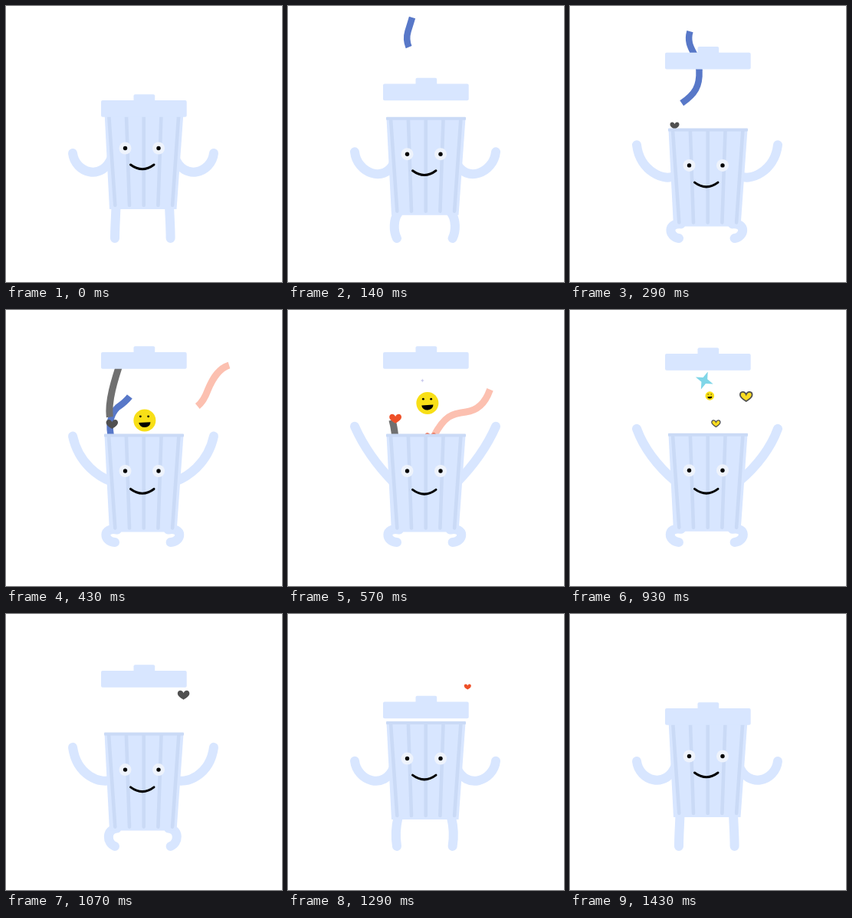
An HTML page with a canvas that plays this animation: 360 px wide and 360 px high, repeating every 1.5 s.

```html
<!DOCTYPE html>
<html lang="en">
<head>
<meta charset="utf-8">
<title>Happy bin</title>
<style>
  html, body { margin: 0; width: 100%; height: 100%; overflow: hidden; background: #fff; }
  canvas { display: block; width: 360px; height: 360px; }
</style>
</head>
<body>
<canvas id="stage" width="360" height="360"></canvas>
<script>
const ctx = document.getElementById('stage').getContext('2d');
const LOOP = 1500, STEPS = 21;
const PALE = '#d8e6ff', SHADE = '#cadaf6', DARK = '#505050';

const clamp01 = v => Math.min(1, Math.max(0, v));
const mix = (a, b, u) => a + (b - a) * u;
const progress = (k, from, to) => clamp01((k - from) / (to - from));

// Quadratic ease in and out between two steps
function ease(k, from, to) {
  const u = progress(k, from, to);
  return u < 0.5 ? 2 * u * u : 1 - 2 * (1 - u) ** 2;
}

// Swells from 0 to 1 and back between two steps
const swell = (k, from, to) => Math.sin(Math.PI * progress(k, from, to));

function disc(x, y, r, color) {
  ctx.fillStyle = color;
  ctx.beginPath();
  ctx.arc(x, y, r, 0, Math.PI * 2);
  ctx.fill();
}

function stroke(path, width, color, cap = 'round') {
  ctx.lineWidth = width;
  ctx.lineCap = cap;
  ctx.strokeStyle = color;
  ctx.stroke(path);
}

function box(x, y, w, h, r) {
  ctx.beginPath();
  ctx.roundRect(x, y, w, h, r);
  ctx.fill();
}

// Strands slide along their paths into the bin; birth is when the head enters
const STRAND_SPEED = 42;
const strands = [
  { path: new Path2D('M162 15 C160 22 158 28 156.5 33 C150 55 168 62 168.5 84 C169.5 105 163 115 145.5 127 C136 136 133 150 138 170 L150 265'),
    color: '#5878c8', width: 8.5, birth: 1.05, length: 105 },
  { path: new Path2D('M291 72 C278 76 270 88 263 105 C257 122 247 131 232 133 C214 135 204 138 190 165 L180 270'),
    color: '#fcc0b0', width: 9, birth: 4.35, length: 110 },
  { path: new Path2D('M152 60 C140 95 131 125 136.5 146 C139 155 141 165 146 260'),
    color: '#707070', width: 9, birth: 4.05, length: 80 }
];

function drawStrand({ path, color, width, birth, length }, k) {
  const head = (k - birth) * STRAND_SPEED;
  if (head <= 0) return;
  const tail = Math.max(0, head - length);
  ctx.setLineDash([head - tail, 2000]);
  ctx.lineDashOffset = -tail;
  stroke(path, width, color, 'butt');
  ctx.setLineDash([]);
}

const HEART_LIFE = 10.5;
const HEART = new Path2D('M0 6 C-4 3.5 -8 1 -8 -2.5 C-8 -7 -2 -8 0 -3 C2 -8 8 -7 8 -2.5 C8 1 4 3.5 0 6 Z');
const heartColors = [DARK, '#ee5028', '#fbdc20'];
const hearts = [
  { birth: 2, x: 134.7, y: 163.5 },
  { birth: 4.2, x: 182.5, y: 180 },
  { birth: 8.6, x: 225.8, y: 129 }
];

function drawHeart({ birth, x, y }, k) {
  const size = Math.sqrt(Math.max(0, swell(k, birth, birth + HEART_LIFE)));
  if (size < 0.1) return;
  const age = k - birth;
  const color = Math.floor((k + 8) % 11 / 4);
  ctx.save();
  ctx.translate(x + 0.9 * age, y - 3.6 * age);
  ctx.scale(size, size);
  ctx.fillStyle = heartColors[color];
  ctx.fill(HEART);
  if (color === 2) stroke(HEART, 1.8, DARK);
  ctx.restore();
}

function drawStar(k) {
  const size = 15.5 * swell(k, 7.6, 15.2);
  if (size < 0.1) return;
  ctx.save();
  ctx.translate(175.3, 92);
  ctx.rotate(0.37 * progress(k, 8, 11));
  ctx.fillStyle = k < 9 ? '#c6c6ec' : '#80d6e8';
  ctx.beginPath();
  for (let i = 0; i < 8; i++) {
    const r = i % 2 ? size * 0.35 : size;
    ctx.lineTo(r * Math.sin(i * Math.PI / 4), -r * Math.cos(i * Math.PI / 4));
  }
  ctx.fill();
  ctx.restore();
}

function drawSmiley(k) {
  const scale = 1 - progress(k, 11.5, 14);
  if (k < 5 || !scale) return;
  const rise = 1 - (1 - progress(k, 5, 12)) ** 3;
  ctx.save();
  ctx.translate(mix(180, 182.3, rise), mix(163, 112, rise));
  ctx.scale(scale, scale);
  disc(0, 0, 14.5, '#f8df17');
  for (const x of [-5.5, 4.8]) disc(x, -5.3, 1.4, '#000');
  ctx.beginPath();
  ctx.ellipse(0, 2.5, 7.6, 6.5, -0.06, 0, Math.PI);
  ctx.fill();
  ctx.restore();
}

// Draws a limb and its mirror image
function limbs(d, axis) {
  const path = new Path2D(d);
  for (const side of [1, -1]) {
    ctx.save();
    ctx.translate(axis, 0);
    ctx.scale(side, 1);
    ctx.translate(-axis, 0);
    stroke(path, 12, PALE);
    ctx.restore();
  }
}

function drawLimbs(open, drop, lift) {
  const bend = lift * lift;
  limbs(`M87 ${192 - 45 * lift}
    C${90 + 13 * bend} ${218 - 45 * bend} ${126 - 6 * lift} ${229 + drop / 2 - 38 * lift}
    138 ${197 + drop + 4 * lift}`, 179);
  limbs(`M${143.5 + 1.5 * open} ${262 + drop}
    C${143 - 18 * open} ${276 + 7 * open} ${142 - 15 * open} ${290 + 12 * open} 142 303`, 178.3);
}

function drawBody(drop, lift) {
  ctx.save();
  ctx.translate(0, drop);
  ctx.fillStyle = PALE;
  ctx.fill(new Path2D('M128.5 139 H231.5 L222.5 265 H135 Z'));
  for (let i = -2; i <= 2; i++) {
    const x = 179.7 + 22.8 * i;
    stroke(new Path2D(`M${x} 141 L${mix(x, 179.7, 0.18)} 260`), 4.6, SHADE);
  }
  ctx.fillStyle = SHADE;
  box(128, 137, 104, 4, 1);
  for (const x of [155.5, 199]) {
    disc(x, 185.5, 8, '#eef3fc');
    disc(x, 185.5, 2.7, '#000');
  }
  ctx.translate(0, 3.2 * lift);
  stroke(new Path2D('M162.5 207 Q178 218.5 193 207'), 3, '#000');
  ctx.restore();
}

function drawLid(shift) {
  ctx.fillStyle = PALE;
  box(124, 122.9 + shift, 111.7, 21.8, 2);
  box(166.5, 115.2 + shift, 27.7, 12, 2);
}

function draw(k) {
  const open = ease(k, 0, 5.05) - ease(k, 12, 20);
  const lift = ease(k, 0.7, 10.2) - ease(k, 10.7, 18.5);
  const drop = 24.5 * open;
  ctx.fillStyle = '#fff';
  ctx.fillRect(0, 0, 360, 360);
  drawLimbs(open, drop, lift);
  strands.forEach(s => drawStrand(s, k));
  drawStar(k);
  drawSmiley(k);
  hearts.forEach(h => drawHeart(h, k));
  drawBody(drop, lift);
  drawLid(-68 * open);
}

// Steps start on whole hundredths of a second
const startOf = k => Math.round(k * LOOP / STEPS / 10) * 10;

function stepAt(time) {
  let k = STEPS - 1;
  while (startOf(k) > time) k--;
  return k;
}

let origin;
function tick(now) {
  origin ??= now;
  draw(stepAt(Math.max(0, now - origin) % LOOP));
  requestAnimationFrame(tick);
}
draw(0);
requestAnimationFrame(tick);
</script>
</body>
</html>
```
